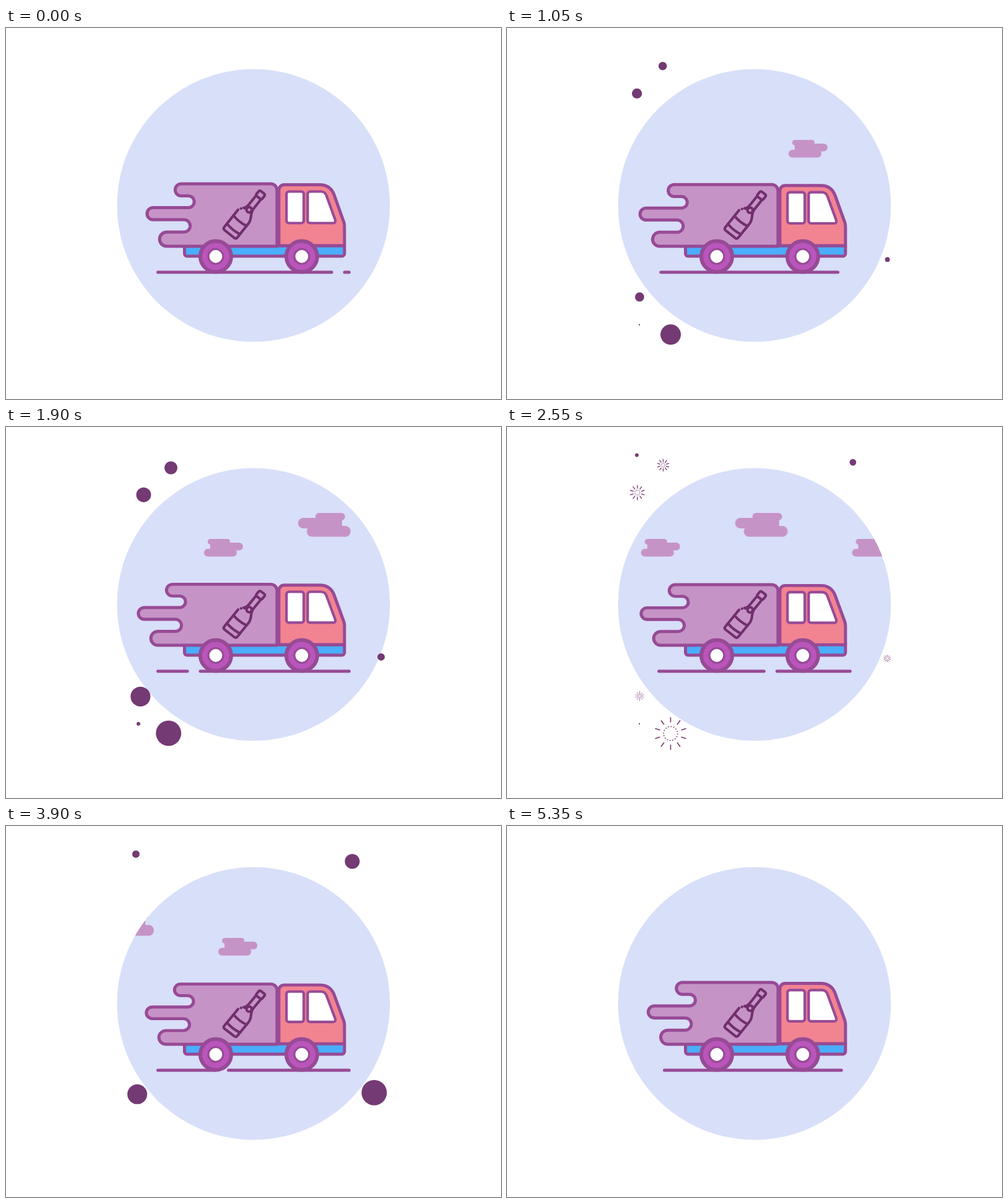
An HTML page that plays this animation: 800x600 px, repeating every 5400 ms.

```html
<!DOCTYPE html>
<html lang="en">
<head>
<meta charset="utf-8">
<title>Delivery truck</title>
<style>
  html, body { margin: 0; width: 100%; height: 100%; overflow: hidden; background: #fff; }
  svg { display: block; width: 800px; height: 600px; }
  .line { stroke: #974a95; stroke-width: 5; stroke-linecap: round; stroke-linejoin: round; }
  .cloud, #box { fill: #c693c7; }
  .glass { fill: #fff; stroke-width: 4.2; }
  .rim { fill: #b955bb; stroke-width: 6; }
  .hub { fill: #fff; stroke-width: 3.2; }
  #bottle { fill: none; stroke: #702f6d; stroke-width: 4.2; stroke-linecap: round; stroke-linejoin: round; }
  #dots { fill: #743a73; stroke: #743a73; }
  #dots .ball { stroke: none; }
  #dots .ring { fill: none; }
  #dots .rays { fill: none; stroke-linecap: round; }
  .cloud { animation: drift 5400ms linear infinite; }
  #ground { animation: roll 1080ms linear infinite; }
  @keyframes drift { to { transform: translateX(-858px); } }
  @keyframes roll { from { stroke-dashoffset: 5; } to { stroke-dashoffset: 312; } }
</style>
</head>
<body>
<svg viewBox="0 0 800 600">
  <defs>
    <clipPath id="disc"><circle cx="400" cy="287" r="220.5"/></clipPath>
    <g id="small">
      <rect x="6" y="181" width="36" height="9" rx="4.5"/>
      <rect x="10" y="187" width="53" height="12.5" rx="6.2"/>
      <rect x="10" y="185" width="30" height="20"/>
      <rect y="197" width="53" height="12.5" rx="6.2"/>
    </g>
    <g id="large">
      <rect x="28" y="139" width="48" height="12" rx="6"/>
      <rect y="147" width="71" height="17" rx="8.5"/>
      <rect x="32" y="145" width="39" height="22" rx="3"/>
      <rect x="14" y="160" width="71" height="17.5" rx="8.7"/>
    </g>
    <g id="wheel">
      <circle r="25" class="line rim"/>
      <circle r="12" class="line hub"/>
    </g>
  </defs>

  <circle cx="400" cy="287" r="220.5" fill="#d8dff8"/>
  <g clip-path="url(#disc)">
    <use class="cloud" href="#small" x="622"/>
    <use class="cloud" href="#small" x="963"/>
    <use class="cloud" href="#large" x="774"/>
  </g>

  <path id="ground" class="line" d="M245.5 395H554.5" stroke-dasharray="286 21"/>
  <path class="line" fill="#4aaefc" d="M288.5 352H547V365a4 4 0 0 1 -4 4H292.5a4 4 0 0 1 -4 -4Z"/>

  <g id="body">
    <path id="box" class="line"/>
    <path class="line" fill="#f28391" d="M441 352V262a8.5 8.5 0 0 1 8.5 -8.5H507C519 253.5 526 259 530 269L546 314Q547 317 547 321V352Z"/>
    <rect class="line glass" x="453.3" y="264.5" width="28" height="51" rx="4"/>
    <path class="line glass" d="M491.5 264.5H509Q515 264.5 517.5 270L532 310Q533.5 315.5 528.5 315.5H491.5a4 4 0 0 1 -4 -4V268.5a4 4 0 0 1 4 -4Z"/>
    <g id="bottle" transform="translate(362 332) rotate(38.5)">
      <path d="M-13.5 -38V-2Q-13.5 1.5 -10 1.5H10Q13.5 1.5 13.5 -2V-31C13.5 -42 5 -44 5 -55V-74M-5 -74V-56Q-5 -51 -7 -47"/>
      <path d="M-13.5 -9Q0 -6 13.5 -9M-13.5 -26Q0 -23 13.5 -26M-11 -42.5v.1M-8.5 -46Q-6 -46 -4 -48"/>
      <rect x="-6" y="-84.5" width="12" height="10.5" rx="2.5"/>
      <circle cx=".6" cy="-49" r="4.3"/>
    </g>
  </g>
  <use href="#wheel" x="339" y="369.5"/>
  <use href="#wheel" x="478" y="369.5"/>
  <g id="dots"></g>
</svg>

<script>
const LOOP = 5400, GROW = 950, LIFE = 1850, BURST = 850, RAYS = 10;
const TAU = 2 * Math.PI;
const $ = id => document.getElementById(id);
const clamp = k => Math.max(0, Math.min(1, k));
const smooth = k => k * k * (3 - 2 * k);

function set(el, attrs) {
  for (const name in attrs) el.setAttribute(name, attrs[name]);
}

function make(tag, parent, attrs = {}) {
  const el = document.createElementNS("http://www.w3.org/2000/svg", tag);
  set(el, attrs);
  return parent.appendChild(el);
}

// A dot is born, grows, sways about its home and bursts.
function dot(x, y, size, born, sway) {
  const g = make("g", $("dots"));
  return {
    x, y, size, born, sway, g,
    ball: make("circle", g, { class: "ball" }),
    ring: make("circle", g, { class: "ring", pathLength: 16, "stroke-dasharray": ".4 .6" }),
    rays: make("path", g, { class: "rays" })
  };
}

const dots = [
  dot(260, 64, 10.5, 480, 8.4),
  dot(217, 108, 12, 460, 7),
  dot(610, 373, 6, 480, -4.8),
  dot(216, 435.5, 16, 600, 1.7),
  dot(214, 480, 3, 650, 0),
  dot(263.5, 495.5, 20.5, 370, -1),
  dot(552, 55, 12, 2110, -7.8),
  dot(597.5, 432, 20.5, 2500, 2.5),
  dot(216, 435, 16, 2610, 4),
  dot(208, 45, 6, 2080, -2)
];

function drawDot({ x, y, size, born, sway, g, ball, ring, rays }, t) {
  const age = t - born;
  const p = clamp((age - LIFE) / BURST);
  const on = age > 0 && p < 1;
  g.style.display = on ? "" : "none";
  if (!on) return;

  const swing = -sway * Math.cos(TAU * (t - 1050) / 1400);
  const cx = x + swing, cy = y + 0.3 * swing;
  const r = size * smooth(clamp(age / GROW)) * clamp(1 - (age - LIFE) / 80);
  set(ball, { cx, cy, r });

  const e = 1 - (1 - p) ** 2, reach = 2 * size;
  const inner = reach * e ** 1.7, outer = reach * e;
  let d = "";
  for (let i = 0; i < RAYS && p; i++) {
    const a = TAU * (i / RAYS - 0.25), c = Math.cos(a), s = Math.sin(a);
    d += `M${cx + c * inner} ${cy + s * inner}L${cx + c * outer} ${cy + s * outer}`;
  }
  const width = 1.9 * (1 - p * p) * Math.min(1, reach / 25, 1.6 * e);
  set(rays, { d, "stroke-width": width });
  set(ring, { cx, cy, r: reach * 0.7 * e * e, "stroke-width": width });
  g.style.opacity = clamp((1 - p) / 0.25);
}

function boxPath(d) {
  return `M438 353V262a10 10 0 0 0 -10 -10H${283.5 + d}a9.75 9.75 0 0 0 0 19.5`
    + `H${295 + d}a9.5 9.5 0 0 1 0 19H${238 + d}a9.75 9.75 0 0 0 0 19.5`
    + `H${288 + d}a10 10 0 0 1 0 20H${260 + d}a11.5 11.5 0 0 0 0 23Z`;
}

function draw(t) {
  const p = t / LOOP;
  const stretch = -7.2 * (1 - Math.cos(TAU * (7 * p + 0.045)));
  set($("box"), { d: boxPath(stretch) });

  // The body settles slowly and springs back at the end of the loop.
  const sag = 10 * p ** 1.2 * Math.sqrt(1 - p);
  set($("body"), { transform: `translate(0 354) scale(1 ${1 - sag / 101}) translate(0 -354)` });
  dots.forEach(item => drawDot(item, t));
}

const begin = performance.now();
function frame() {
  draw((performance.now() - begin) % LOOP);
  requestAnimationFrame(frame);
}
frame();
</script>
</body>
</html>
```
